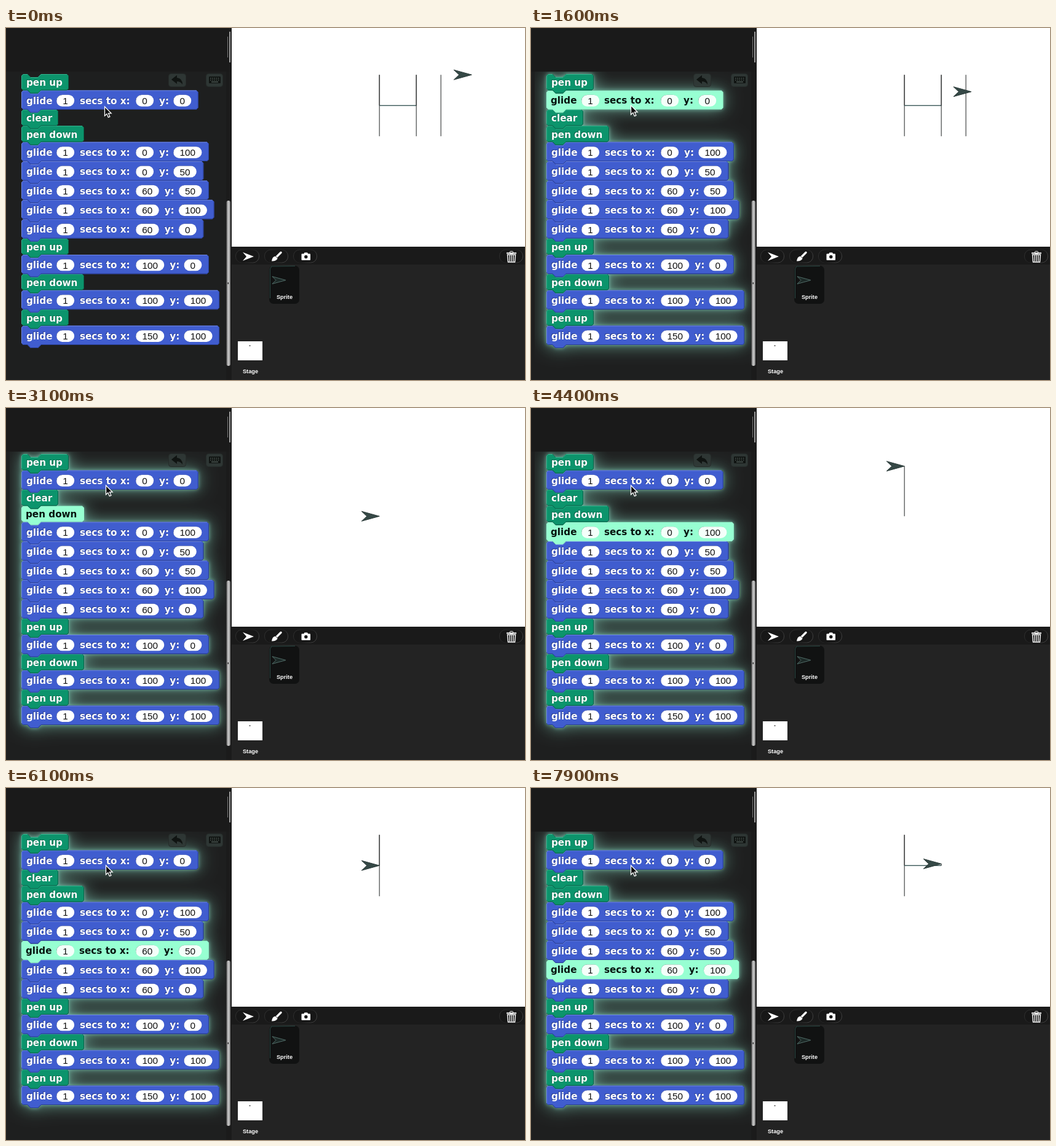
An HTML page with a canvas that plays this animation: 844x573 px, repeating every 8 s.

```html
<!DOCTYPE html>
<html lang="en">
<head>
<meta charset="utf-8">
<title>Pen blocks</title>
<style>
html, body { margin: 0; width: 100%; height: 100%; overflow: hidden; background: #1a1a1a; }
canvas { display: block; }
</style>
</head>
<body>
<canvas id="c" width="844" height="573"></canvas>
<script>
const ctx = document.getElementById('c').getContext('2d');
const LOOP = 8000, STEP = 100, START = 485, PAUSE = 420, GLIDE = 1000;
const LEFT = 25, GREEN = '#0c946c', BLUE = '#405dcf', LIT = '#97ffd2';
const BOLD = 'bold 15.2px "DejaVu Sans", Verdana, sans-serif';
const DIGITS = '15.3px "Liberation Sans", Arial, sans-serif';
const LABEL = 'bold 9.2px "Liberation Sans", Arial, sans-serif';

const script = [
  'pen up', [0, 0], 'clear', 'pen down', [0, 100], [0, 50], [60, 50], [60, 100],
  [60, 0], 'pen up', [100, 0], 'pen down', [100, 100], 'pen up', [150, 100]
];
const textWidth = { 'pen up': 77, 'clear': 60, 'pen down': 102 };

const ovalWidth = v => 20.5 + 8.6 * String(v).length;

// Stack the blocks from the top of the pane
let nextY = 75;
const blocks = script.map(cmd => {
  const glide = Array.isArray(cmd);
  const b = { cmd, glide, y: nextY, h: glide ? 31.4 : 26.4 };
  b.w = glide ? 229.5 + ovalWidth(cmd[0]) + ovalWidth(cmd[1]) : textWidth[cmd];
  nextY += b.h;
  return b;
});

// State of the program at time t
function run(t, drawn) {
  let pos = [150, 100], down = false, segs = drawn, active = -1, at = START;
  for (let i = 0; i < script.length && t >= at; i++) {
    const cmd = script[i], exec = at + PAUSE, glide = Array.isArray(cmd);
    const end = exec + (glide ? GLIDE : 0);
    if (t < end) active = i;
    if (t >= exec) {
      if (glide) {
        const k = Math.min(1, (t - exec) / GLIDE);
        const to = pos.map((p, j) => p + (cmd[j] - p) * k);
        if (down && k > 0) segs = [...segs, [pos, to]];
        pos = to;
      } else if (cmd === 'clear') segs = [];
      else down = cmd === 'pen down';
    }
    at = end;
  }
  return { pos, segs, active };
}
const finished = run(1e9, []).segs;

function poly(pts, fill, stroke, width = 1) {
  ctx.beginPath();
  pts.forEach(p => ctx.lineTo(p[0], p[1]));
  ctx.closePath();
  if (fill) { ctx.fillStyle = fill; ctx.fill(); }
  if (stroke) { ctx.strokeStyle = stroke; ctx.lineWidth = width; ctx.stroke(); }
}

function rect(x, y, w, h, fill) {
  ctx.fillStyle = fill;
  ctx.fillRect(x, y, w, h);
}

function round(x, y, w, h, r, fill, stroke) {
  ctx.beginPath();
  ctx.roundRect(x, y, w, h, r);
  if (fill) { ctx.fillStyle = fill; ctx.fill(); }
  if (stroke) { ctx.strokeStyle = stroke; ctx.lineWidth = 1; ctx.stroke(); }
}

function line(pts, color, width = 1) {
  ctx.beginPath();
  pts.forEach(p => ctx.lineTo(p[0], p[1]));
  ctx.strokeStyle = color;
  ctx.lineWidth = width;
  ctx.stroke();
}

function write(s, x, y, font, color, align = 'left') {
  ctx.font = font;
  ctx.textAlign = align;
  ctx.textBaseline = 'alphabetic';
  ctx.fillStyle = color;
  ctx.fillText(s, x, y);
}

function blockPath(b) {
  const x = LEFT, r = x + b.w, y = b.y, e = y + b.h;
  const p = new Path2D();
  [[x, y + 3], [x + 3, y], [x + 10, y], [x + 15, y + 5], [x + 27, y + 5], [x + 32, y],
   [r - 3, y], [r, y + 3], [r, e - 3], [r - 3, e], [x + 32, e], [x + 27, e + 5],
   [x + 15, e + 5], [x + 10, e], [x + 3, e], [x, e - 3]].forEach(q => p.lineTo(q[0], q[1]));
  p.closePath();
  return p;
}

function word(s, x, y, lit) {
  if (lit) return write(s, x - 1, y - 1, BOLD, '#06140f');
  write(s, x - 1, y - 1, BOLD, 'rgba(0,0,0,.3)');
  write(s, x, y, BOLD, '#fff');
}

function oval(v, x, cy, lit) {
  const w = ovalWidth(v);
  round(x, cy - 9.5, w, 19, 9.5, lit ? '#f4fffa' : '#fff');
  ctx.save();
  ctx.beginPath();
  ctx.roundRect(x, cy - 9.5, w, 19, 9.5);
  ctx.clip();
  round(x - .2, cy - 9.7, w + 2, 21, 10, null, lit ? '#5c9c83' : '#24347c');
  ctx.restore();
  write(v, x + w / 2, cy + 5.8, DIGITS, '#111', 'center');
}

function drawBlock(b, lit) {
  const x = LEFT, r = x + b.w, y = b.y, e = y + b.h;
  ctx.fillStyle = lit ? LIT : b.glide ? BLUE : GREEN;
  ctx.fill(blockPath(b));
  if (!lit) {
    const light = b.glide ? '#6f88e6' : '#35b790', dark = b.glide ? '#2a3f96' : '#086349';
    line([[x + .5, e - 3], [x + .5, y + 3], [x + 3, y + .5], [x + 10, y + .5]], light);
    line([[x + 15, y + 5.5], [x + 27, y + 5.5], [x + 32, y + .5], [r - 3, y + .5]], light);
    line([[r - .5, y + 3], [r - .5, e - 3], [r - 3, e - .5], [x + 32, e - .5],
          [x + 27, e + 4.5], [x + 15, e + 4.5], [x + 10, e - .5], [x + 3, e - .5]], dark);
  }
  if (!b.glide) return word(b.cmd, 33, y + 19.3, lit);
  const cy = y + 16.8, base = cy + 5.4, [gx, gy] = b.cmd;
  const yx = 220 + ovalWidth(gx);
  word('glide', 33, base, lit);
  oval(1, 82, cy, lit);
  word('secs to x:', 120, base, lit);
  oval(gx, 211, cy, lit);
  word('y:', yx, base, lit);
  oval(gy, yx + 23, cy, lit);
}

function drawGlow() {
  ctx.save();
  ctx.beginPath();
  ctx.rect(6, 71, 352, 502);
  ctx.clip();
  const all = new Path2D();
  blocks.forEach(b => all.addPath(blockPath(b)));
  ctx.fillStyle = '#1d1d1d';
  ctx.shadowColor = 'rgba(120,190,170,.8)';
  ctx.shadowBlur = 28;
  ctx.fill(all);
  ctx.shadowColor = 'rgba(130,215,190,.7)';
  ctx.shadowBlur = 6;
  ctx.fill(all);
  ctx.restore();
}

function paneButtons() {
  round(264.5, 74.5, 28, 21, 4, 'rgba(48,57,54,.9)', '#262c2a');
  poly([[269, 84], [278, 77], [278, 81]], '#101412');
  ctx.beginPath();
  ctx.moveTo(269, 84);
  ctx.lineTo(278, 77);
  ctx.lineTo(278, 81);
  ctx.quadraticCurveTo(287, 82, 287, 92);
  ctx.quadraticCurveTo(284, 87, 278, 87);
  ctx.lineTo(278, 91);
  ctx.fill();
  round(325.5, 74.5, 27, 21, 4, 'rgba(48,57,54,.9)', '#262c2a');
  round(330, 79, 19, 11, 1, '#101412');
  for (let r = 0; r < 2; r++)
    for (let i = 0; i < 5; i++) rect(332 + i * 3.2, 81 + r * 3, 1.6, 1.5, '#4c5753');
  rect(334, 87, 11, 1.5, '#4c5753');
}

function handle(x, y, w, h) {
  const g = ctx.createLinearGradient(x, 0, x + w, 0);
  g.addColorStop(0, '#686868');
  g.addColorStop(.5, '#cfcfcf');
  g.addColorStop(1, '#777');
  round(x, y, w, h, 3, g);
}

function drawPane(t, active) {
  rect(0, 0, 367, 573, '#1a1a1a');
  rect(0, 71, 358, 502, '#1e1f1f');
  rect(358, 71, 9, 502, '#1b1b1b');
  line([[360.5, 14], [360.5, 48]], '#777');
  line([[364, 6], [364, 56]], '#bbb', 1.6);
  if (t >= START) drawGlow();
  paneButtons();
  // Bottom up, so each tab covers the block beneath it
  for (let i = blocks.length - 1; i >= 0; i--) drawBlock(blocks[i], i === active);
  handle(358.5, 281, 6.5, 269);
  rect(360.5, 414, 1.5, 3, '#333');
}

function arrow(x, y, len, half, notch, fill, stroke) {
  poly([[x, y], [x - len, y - half], [x - len + notch, y], [x - len, y + half]], fill, stroke);
}

function drawStage({ pos, segs }) {
  rect(367, 0, 477, 356, '#fff');
  const sx = x => 607.3 + x, sy = y => 176.2 - y;
  for (const [a, b] of segs) {
    const flat = a[1] === b[1];
    line([[sx(a[0]), sy(a[1])], [sx(b[0]), sy(b[1])]],
      flat ? 'rgba(50,80,82,.9)' : 'rgba(45,48,48,.72)', 1.5);
  }
  arrow(sx(pos[0]), sy(pos[1]), 29, 8, 8.5, '#354846', '#2b3a38');
}

function pill(x, y) {
  const g = ctx.createLinearGradient(x, y, x + 37, y + 21);
  g.addColorStop(0, '#343434');
  g.addColorStop(.5, '#1c1c1c');
  g.addColorStop(1, '#484848');
  round(x, y, 38, 21, 10, '#171717', g);
}

function drawCorral() {
  rect(367, 356, 477, 217, '#232323');
  rect(367, 356, 477, 29, '#1a1a1a');
  [373.5, 420.5, 467.5, 802.5].forEach(x => pill(x, 361));
  arrow(403, 372, 18, 7, 6, '#fff');

  // Brush
  ctx.lineCap = 'round';
  line([[447, 365.5], [440, 372.5]], '#fff', 3.4);
  ctx.lineCap = 'butt';
  ctx.beginPath();
  ctx.moveTo(432, 379.5);
  ctx.quadraticCurveTo(433, 372, 438, 371.5);
  ctx.quadraticCurveTo(442, 372, 441.5, 375.5);
  ctx.quadraticCurveTo(439, 380, 432, 379.5);
  ctx.fillStyle = '#fff';
  ctx.fill();
  line([[437.6, 370.8], [442, 375]], '#1a1a1a', .8);

  // Camera
  round(480.5, 367.5, 14.5, 10.5, 1, '#fff');
  poly([[484, 368], [485.5, 365.5], [490, 365.5], [491.5, 368]], '#fff');
  ctx.beginPath();
  ctx.arc(487.8, 372.5, 2.7, 0, 7);
  ctx.fillStyle = '#1a1a1a';
  ctx.fill();

  // Trash can
  round(819.5, 363.5, 5, 4, 1, null, '#fff');
  rect(814, 365.5, 16, 2, '#fff');
  poly([[815.5, 369], [828.5, 369], [827.5, 381], [816.5, 381]], null, '#fff', 1.4);
  [819, 822, 825].forEach(x => line([[x, 370], [x, 380]], '#fff', 1.3));

  // Sprite and stage icons
  round(428, 387, 49, 62, 7, '#111212');
  line([[429.5, 440], [429.5, 392], [432, 388], [470, 387.5]], '#2c4a45');
  arrow(455, 410.5, 22, 6, 6, '#1c2826', '#526e69');
  write('Sprite', 453, 441, LABEL, '#fff', 'center');
  rect(377, 510, 40, 31, '#fff');
  rect(395.5, 516.5, 2, 1.5, '#444');
  write('Stage', 397.5, 561.5, LABEL, '#fff', 'center');
}

function drawCursor(t) {
  const k = Math.min(1, t / 400), x = 160.5 + 2 * k, y = 128 - 2 * k;
  const pts = [[0, 0], [0, 15], [3.4, 11.8], [5.8, 17.4], [8.4, 16.3], [6, 10.8], [10.6, 10.8]];
  poly(pts.map(p => [x + p[0], y + p[1]]), '#0a0a0a', '#fff', 1.3);
}

function draw(t) {
  const state = run(t, finished);
  drawPane(t, state.active);
  drawStage(state);
  drawCorral();
  drawCursor(t);
}

const origin = performance.now();
function frame() {
  const t = (performance.now() - origin) % LOOP;
  draw(Math.floor(t / STEP) * STEP);
  requestAnimationFrame(frame);
}
frame();
</script>
</body>
</html>
```
